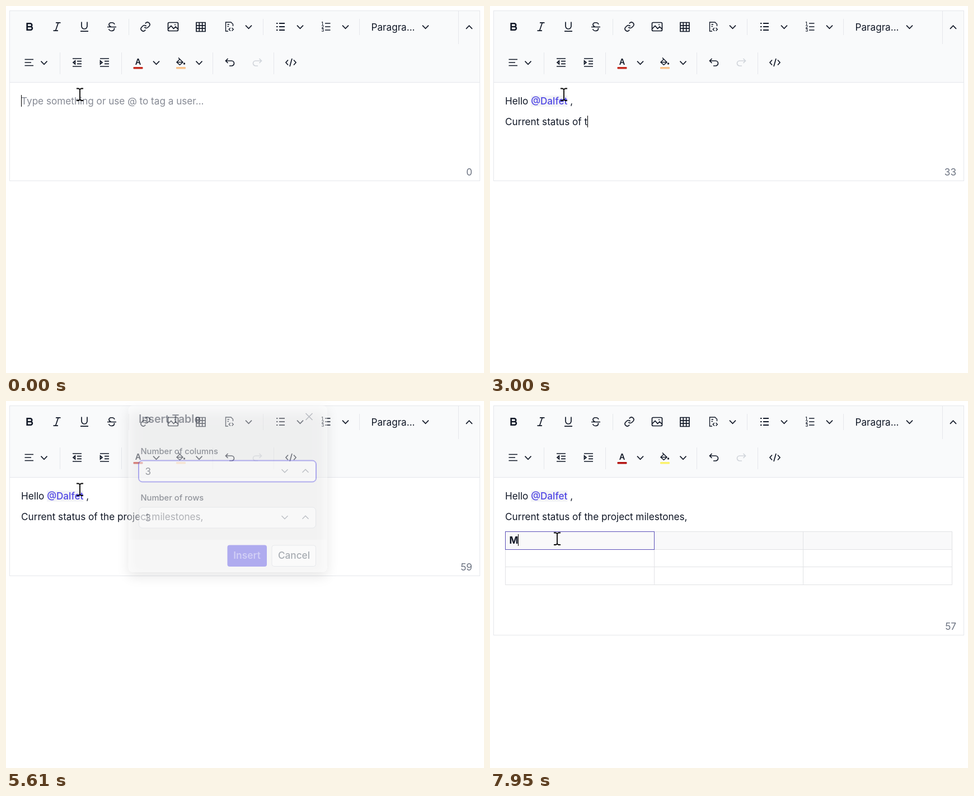
An HTML page with a canvas for the animation above (8 s loop, 854 px wide and 656 px high).

```html
<!DOCTYPE html>
<html lang="en">
<head>
<meta charset="utf-8">
<title>Rich text editor</title>
<style>
html, body { margin: 0; width: 100%; height: 100%; overflow: hidden; background: #fff; }
canvas { display: block; }
</style>
</head>
<body>
<canvas id="stage" width="854" height="656"></canvas>
<script>
const LOOP = 8000, KEY = 66, SIZE = 17.15, SMALL = 13.57;
const INK = '#111827', GREY = '#6b7280', LINE = '#e5e7eb', PANEL = '#f9fafb', ACCENT = '#4f46e5';
const c = document.getElementById('stage').getContext('2d');

const clamp = (v, lo, hi) => Math.min(hi, Math.max(lo, v));
const ramp = (t, a, b) => clamp((t - a) / (b - a), 0, 1);
// Number of keys pressed so far in runs of [start, count]
const typed = (t, runs) => runs.reduce((n, [at, max]) => n + clamp(Math.floor((t - at) / KEY) + 1, 0, max), 0);

function setFont(size, weight) { c.font = `${weight} ${size}px Inter, sans-serif`; }
// Text centred vertically on y; returns the x where it ends
function text(s, x, y, { size = SIZE, weight = 400, color = INK, align = 'left' } = {}) {
  setFont(size, weight);
  c.fillStyle = color;
  c.textAlign = align;
  c.fillText(s, x, Math.round(y + size * 0.355));
  return x + c.measureText(s).width;
}
function rect(x, y, w, h, fill) { c.fillStyle = fill; c.fillRect(x, y, w, h); }
function stroke(x, y, path, width = 1.7, color = INK) {
  c.save();
  c.translate(x, y);
  c.lineWidth = width;
  c.strokeStyle = color;
  c.stroke(new Path2D(path));
  c.restore();
}
function box(x, y, w, h, r, fill, border) {
  c.beginPath();
  c.roundRect(x, y, w, h, r);
  if (fill) { c.fillStyle = fill; c.fill(); }
  if (border) { c.lineWidth = 1; c.strokeStyle = border; c.stroke(); }
}
function disc(x, y, r, fill) {
  c.beginPath();
  c.arc(x, y, r, 0, 7);
  c.fillStyle = fill;
  c.fill();
}
function panel(x, y, w, h, r) {
  c.save();
  c.shadowColor = 'rgba(0,0,0,.25)';
  c.shadowBlur = 8;
  c.shadowOffsetY = 2;
  box(x, y, w, h, r, '#fff');
  c.restore();
}
function faded(alpha, draw) {
  if (alpha <= 0) return;
  c.save();
  c.globalAlpha = alpha;
  draw();
  c.restore();
}
function clip(x, y, w, h) {
  c.beginPath();
  c.rect(x, y, w, h);
  c.clip();
}

const DOWN = 'M-5.5-2.8L0 2.8L5.5-2.8', UP = 'M-5.5 2.8L0-2.8L5.5 2.8';
const GRID = 'M-8-8H8V8H-8ZM-8-2.7H8M-8 2.7H8M-2.7-8V8M2.7-8V8';
const BARS = 'M-8-7H8M0-2.4H8M0 2.4H8M-8 7H8';
const ICONS = [
  [42, 37, 'M-4.3 0H1.4A2.8 2.8 0 0 0 1.4-5.7H-4.3V5.7H2.1A2.8 2.8 0 0 0 2.1 0', 2.6],
  [91, 37, 'M-2-7.2H6.5M-6.5 7.2H2M2.4-7L-2.4 7'],
  [140, 37, 'M-5-8.5V-1A5 5 0 0 0 5-1V-8.5M-7 8.2H7'],
  [189, 37, 'M-8 .5H8M4.8-4.2C4-8.3-5-8.3-5-3.8C-5-1.8-3.5-.6-1.5 .2M4.2 2.2C6.5 8.5-4.5 9.2-5.2 4'],
  [298.5, 37, 'M-7-7.5H7A2 2 0 0 1 9-5.5V5.5A2 2 0 0 1 7 7.5H-7A2 2 0 0 1-9 5.5V-5.5A2 2 0 0 1-7-7.5ZM-9 4L-3.5-1.5L1 3.5L4.5 0L9 4.5M2.5-3.5h2'],
  [348, 37.5, GRID],
  [399, 37, 'M-2 8H-6.5V-8H3L6.5-4.5V-1M2 2L-.8 4.8L2 7.6M4.5 2L7.3 4.8L4.5 7.6M-3.5-4H0M-3.5-.5H-1', 1.4],
  [490, 37, 'M-2-6H8M-2 0H8M-2 6H8M-7-6h2.5M-7 0h2.5M-7 6h2.5', 1.9],
  [571, 37, 'M-1-6H8.5M-1 0H8.5M-1 6H8.5'],
  [41, 101, 'M-7.5-5.5H8M-7.5 0H4M-7.5 5.5H8', 1.6],
  [127, 101, BARS + 'M-3.5-3L-7 0L-3.5 3Z'],
  [176, 101, BARS + 'M-7.5-3L-4 0L-7.5 3Z'],
  [311, 100, 'M-6 .5L-.5-5L5 .5L-.5 5.3ZM-6 .5H5M-3-7.5L-.5-5', 1.5],
  [400, 101, 'M-3.5-7L-7.5-3L-3.5 1M-7-3H3A4.5 4.5 0 0 1 3 6H-1'],
  [449, 101, 'M3.5-7L7.5-3L3.5 1M7-3H-3A4.5 4.5 0 0 0-3 6H1', 1.7, '#d1d5db'],
  [509, 101, 'M-5-4.5L-9 0L-5 4.5M5-4.5L9 0L5 4.5M2-7L-2 7'],
  [827.5, 38, UP],
  ...[433.5, 525.5, 606.5, 749.5].map(x => [x, 37.5, DOWN]),
  ...[68, 268.5, 345].map(x => [x, 101.5, DOWN])
];
const LINK = 'M-2 1a5 5 0 0 0 7.5.5l3-3a5 5 0 0 0-7-7l-1.8 1.7M2-1a5 5 0 0 0-7.5-.5l-3 3a5 5 0 0 0 7 7l1.8-1.7';

function numbers(x, y) {
  [1, 2, 3].forEach((n, i) => text(n, x - 7.5, y - 6.3 + i * 6.3, { size: 7.5, weight: 600 }));
}

function editor(bottom, late) {
  rect(7, 9, 839, 127, PANEL);
  rect(7, 136, 839, 1, LINE);
  c.lineWidth = 1;
  c.strokeStyle = LINE;
  c.strokeRect(6.5, 8.5, 840, bottom - 8);
  for (const x of [219, 459, 631]) rect(x, 23, 1, 29, LINE);
  for (const x of [96, 206, 369, 478]) rect(x, 83, 1, 39, LINE);
  rect(808, 9, 1, 59, LINE);
  for (const icon of ICONS) stroke(...icon);
  c.save();
  c.translate(249, 37);
  c.scale(0.83, 0.83);
  stroke(0, 0, LINK, 2);
  c.restore();
  numbers(571, 37.5);
  text('Paragra...', 652.5, 37.5);
  text('A', 236, 100, { size: 14.5, weight: 600, align: 'center' });
  disc(318.5, 103, 1.7, INK);
  box(227.5, 109, 17, 3.5, 1, late ? '#b31412' : '#c5281c');
  box(304, 109, 17, 3.5, 1, late ? '#fbf26a' : '#f8c088');
}

const LINE2 = 'Current status of the project milestones,';
const RUNS1 = [[320, 7]], RUNS2 = [[1794, 9], [2390, 13], [3250, 12], [4060, 7]];
const RUNS3 = [[4592, 1], [4940, 2]];
const MENTION = '@Dalfet';
const T = { pick: 1260, comma: 1530, enter1: 1662, enter2: 4526, filter: 5144, dialog: 5610, table: 6560, move: 6940, header: 7470, letter: 7880 };

const slash = t => t < T.dialog ? '/ta'.slice(0, typed(t, RUNS3)) : '';
const total = t => (t < T.pick ? typed(t, RUNS1) : t < T.comma ? 14 : 15)
  + typed(t, RUNS2) + slash(t).length + (t >= T.letter);

function caret(x, y) { rect(Math.round(x), y - 11, 1, 21, '#000'); }

function content(t) {
  let x = 27;
  if (t < 320) text('Type something or use @ to tag a user...', x, 170, { color: '#868a94' });
  else if (t < T.pick) x = text('Hello @'.slice(0, typed(t, RUNS1)), x, 170);
  else {
    x = text('Hello ', x, 170);
    setFont(SIZE, 500);
    rect(x, 160, c.measureText(MENTION).width, 20, '#f3f4f6');
    x = text(MENTION, x, 170, { weight: 500, color: ACCENT });
    x = text(t < T.comma ? ' ' : ' ,', x, 170);
  }
  const end2 = text(LINE2.slice(0, typed(t, RUNS2)), 27, 207);
  const end3 = text(slash(t), 27, 245);
  if (t < T.enter1) caret(x, 170);
  else if (t < T.enter2) caret(end2, 207);
  else if (t < T.dialog) caret(end3, 245);
}

function table(t) {
  const head = t >= T.header, rows = head ? 3 : 2, h = rows * 31.6;
  if (head) rect(27, 233, 799, 32, '#f9f9fa');
  for (let i = 0; i <= rows; i++) rect(27, Math.round(233 + i * 31.5), 799, 1, '#e1e2e5');
  for (let i = 0; i < 4; i++) rect(27 + i * 266, 233, 1, h, '#e1e2e5');
  c.lineWidth = 1;
  c.strokeStyle = '#5b50b8';
  c.strokeRect(27.5, 233.5, 266, 32);
  const x = t >= T.letter ? text('M', 34.5, 249, { weight: 700 }) : 35;
  caret(x, 249);
}

const PEOPLE = [[MENTION.slice(1), '#c9a58b'], ['Morvena', '#8fa7c4'], ['Tilbrook', '#a6b79a'], ['Quenlin', '#b79ab0']];
function people() {
  panel(73, 180, 307, 245, 4);
  clip(73, 180, 307, 245);
  rect(73, 180, 287, 70, '#e5e5e9');
  PEOPLE.forEach(([name, tone], i) => {
    const y = 215 + i * 71;
    disc(104, y, 21, tone);
    text(name, 138, y - 11, { weight: 500 });
    text(name.toLowerCase() + '@example.com', 138, y + 13, { size: SMALL });
  });
  scrollbar(370, 190, 414, 110);
}

function scrollbar(x, top, bottom, length) {
  box(x - 6, top + 13, 12, length, 6, '#8b8b8b');
  c.fillStyle = '#858585';
  c.fill(new Path2D(`M${x - 7} ${top + 5}L${x} ${top - 5}L${x + 7} ${top + 5}Z`));
  c.fill(new Path2D(`M${x - 7} ${bottom - 5}L${x} ${bottom + 5}L${x + 7} ${bottom - 5}Z`));
}

const BLOCKS = [
  ['T', 'Paragraph', 'Writing with paragraphs.'],
  ['H1', 'Heading 1', 'Use this for a top level heading or title.'],
  ['H2', 'Heading 2', 'Use this for key sections.'],
  ['H3', 'Heading 3', 'Use this for sub sections and group headings.'],
  ['H4', 'Heading 4', 'Use this for the key points of the sub topic.'],
  ['', 'Ordered List', '']
];
function block([mark, title, note], i) {
  const y = 312.5 + i * 63.8;
  text(mark, 60, y + 14.5, { size: 16, color: '#1f2937' });
  text(title, 115.3, y, { weight: 500 });
  text(note, 115.3, y + 26, { size: SMALL });
}
function blocks(filtered) {
  const h = filtered ? 104 : 391;
  panel(27, 254.5, 369, h, 2);
  text(filtered ? 'Inline' : 'Basic Block', 41.5, 274, { weight: 500 });
  rect(27, 294, filtered ? 369 : 348, 63.5, '#e4e4e9');
  c.save();
  clip(27, 254, filtered ? 369 : 348, h);
  if (filtered) {
    block(['', 'Table', 'Insert a table.'], 0);
    stroke(69, 327, GRID, 1.5);
  } else {
    BLOCKS.forEach(block);
    stroke(69, 643, 'M-1-6H8M-1 0H8M-1 6H8', 1.5);
    numbers(69, 643);
  }
  c.restore();
  if (!filtered) scrollbar(385, 266, 635, 124);
}

function field(label, value, y, focus) {
  text(label, 240.5, y - 36, { size: 14.7, weight: 500 });
  if (focus) box(236.5, y - 19.5, 318, 39, 7, null, ACCENT);
  box(237.5, y - 18.5, 316, 37, 6, '#fff', focus ? ACCENT : '#d1d5db');
  text(value, 248.5, y);
  stroke(498, y - 0.5, DOWN, 1.4, GREY);
  stroke(535, y - 0.5, UP, 1.4, GREY);
}
function dialog(t) {
  c.save();
  c.shadowColor = 'rgba(0,0,0,.22)';
  c.shadowBlur = 22;
  c.shadowOffsetY = 8;
  box(218.5, 8, 355.5, 298, 8, '#fff');
  c.restore();
  box(218.5, 248, 355.5, 58, [0, 0, 8, 8], PANEL);
  text('Insert Table', 237, 32, { size: 19.5, weight: 600 });
  stroke(541.5, 28, 'M-6-6L6 6M6-6L-6 6', 1.5, GREY);
  field('Number of columns', '3', 125.5, t < 5940);
  field('Number of rows', t < 6130 ? '3' : '2', 208.5, t >= 5940 && t < 6330);
  box(395.5, 257.5, 70.5, 38.5, 4, ACCENT);
  text('Insert', 430.5, 276, { size: 17.4, weight: 600, color: '#fff', align: 'center' });
  box(475, 258, 78.5, 37.5, 4, '#fff', '#d1d5db');
  text('Cancel', 514.5, 276, { weight: 500, color: '#374151', align: 'center' });
}

function pointer(x, y) {
  stroke(x, y, 'M-6-10.5H-2.5L0-9L2.5-10.5H6M-6 11H-2.5L0 9.5L2.5 11H6M0-9V9.5', 1.8, '#000');
}

function draw(t) {
  rect(0, 0, 854, 656, '#fff');
  const late = t >= T.table;
  const bottom = t >= T.header ? 418 : late ? 387 : 312;
  editor(bottom, late);
  content(t);
  if (late) table(t);
  text(total(t - 60), 833, bottom - 15, { color: GREY, align: 'right' });
  faded(ramp(t, 740, 905) * (1 - ramp(t, T.pick - 40, 1390)), people);
  if (t < T.dialog) faded(ramp(t, 4620, 4740), () => blocks(t >= T.filter));
  faded(ramp(t, T.dialog - 50, 5680) * (1 - ramp(t, 6430, T.table)), () => dialog(t));
  if (t < T.move) pointer(132, 158);
  else pointer(120, 246);
}

function frame() {
  draw(performance.now() % LOOP);
  requestAnimationFrame(frame);
}
frame();
</script>
</body>
</html>
```
